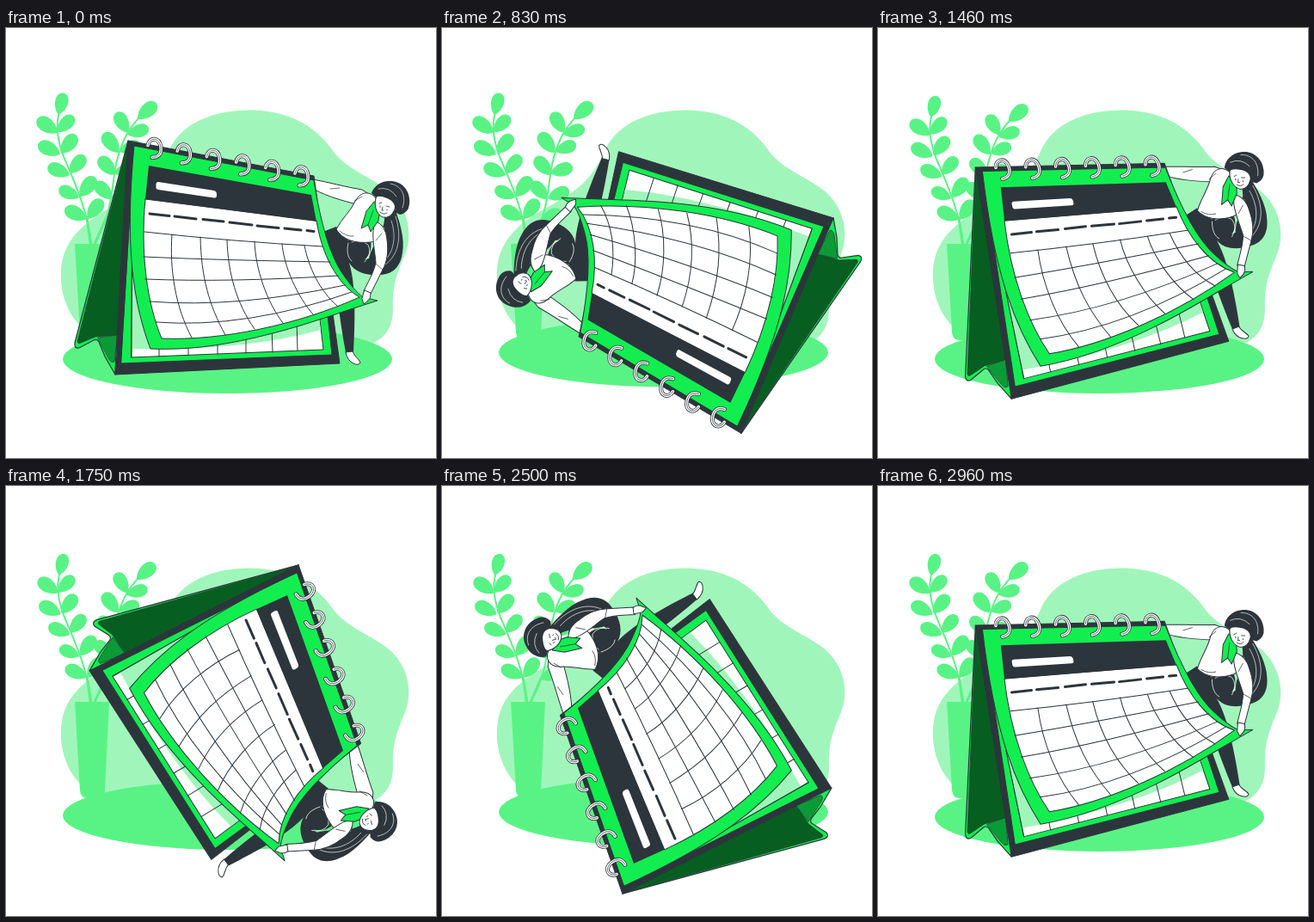
Animation, 500 px wide and 500 px high, one loop 3 s. Source, as an HTML page with a canvas:

```html
<!DOCTYPE html>
<html lang="en">
<head>
<meta charset="utf-8">
<title>Turning calendar</title>
<style>
html, body { margin: 0; width: 100%; height: 100%; overflow: hidden; background: #fff; }
canvas { display: block; width: 100vw; height: 100vh; }
</style>
</head>
<body>
<canvas id="stage" width="500" height="500"></canvas>
<script>
const ctx = document.getElementById('stage').getContext('2d');
const LOOP = 3000, FPS = 24, TICKS = 2.5, DEG_PER_TICK = 4;
const PIVOT = [275, 283];
const INK = '#2d353c', GREEN = '#12ee50', MID = '#59f385', PALE = '#a0f6ba';
const DARK = '#065f20', SHADE = '#0b9b36', WHITE = '#fff';

ctx.lineJoin = ctx.lineCap = 'round';

function shape(d, fill, stroke, width = 1) {
  const p = new Path2D(d);
  if (fill) { ctx.fillStyle = fill; ctx.fill(p); }
  if (stroke) { ctx.strokeStyle = stroke; ctx.lineWidth = width; ctx.stroke(p); }
}
const line = (d, width = 1, color = INK) => shape(d, null, color, width);

function leaf(x, y, tipX, tipY) {
  ctx.save();
  ctx.translate(x, y);
  ctx.rotate(Math.atan2(tipY - y, tipX - x));
  const n = Math.hypot(tipX - x, tipY - y);
  ctx.scale(n, n);
  shape('M0 0C.25 -.36 .96 -.45 1 -.02C.97 .38 .3 .36 0 0Z', MID);
  ctx.restore();
}

const LEAVES = [
  [61, 101, 68, 76], [60, 122, 37, 105], [60, 121, 79, 103], [63, 147, 38, 134],
  [64, 146, 82, 125], [74, 171, 49, 160], [74, 169, 92, 149], [85, 197, 62, 186],
  [86, 196, 104, 174], [94, 222, 69, 209], [95, 222, 112, 200],
  [153, 106, 175, 88], [142, 122, 129, 98], [141, 124, 166, 117], [131, 145, 114, 122],
  [132, 144, 156, 135], [127, 171, 109, 150], [126, 169, 152, 162], [123, 199, 105, 179],
  [123, 198, 148, 189], [115, 224, 139, 214]
];

function backdrop(angle) {
  shape('M100 358C75 342 62 312 64 282C66 248 88 228 118 211C160 188 172 178 188 146' +
    'C201 112 239 95.500 284 95.500C328 96 358 113 378 140C393 163 420 171 443 188' +
    'C467 207 474 238 464 263C455 285 449 298 450 326C450 346 443 358 428 366Z', PALE);
  ctx.fillStyle = MID;
  ctx.beginPath();
  ctx.ellipse(257.5, 381 + 4 * Math.cos(angle), 191.5, 40, 0, 0, 7);
  ctx.fill();
}

function plant(size) {
  ctx.save();
  ctx.translate(97, 255);
  ctx.scale(size, size);
  ctx.translate(-97, -255);
  line('M100 256C95 212 80 180 68 152C59 130 58 112 62 98', 2, MID);
  line('M100 256C124 218 122 190 128 158C134 134 140 120 156 103', 2, MID);
  line('M99 256L94 220M101 256L116 222', 3, MID);
  LEAVES.forEach(l => leaf(...l));
  ctx.restore();
  shape('M80 251H120L115 354Q114 363 106 363H95Q87 363 86 354Z', MID);
}

function stand() {
  shape('M142 131L80 366Q79 373 85 372L102 363Q106 361 108 365L115 382L127 403L142 300Z', GREEN, INK, 1.2);
  shape('M141 137L83 364Q83 368 87 366L104 359L130 357L142 300Z', DARK, INK, .7);
  shape('M107 360L130 357L126 388Q122 390 119 384Z', SHADE, INK, .7);
}

function backPage() {
  shape('M142 131L358 172L388 390L127 403Z', INK, INK);
  shape('M149 137L357 177L379 380L134 390Z', GREEN, INK);
  shape('M147 220L350 210L369 374L146 383Z', WHITE, INK);
  shape('M146.500 270V373Q275 376 366 351L355 280Z', PALE);
  line('M178 360V382M212 355V380.500M246 355V379M279 350V378M309 345L310 377M338 340L339 375');
  line('M147 220L146 383');
}

function frontPage() {
  shape('M149 137L358 177C364 215 374 262 393 288C400 298 408 308 415 313L432 317' +
    'C390 330 350 345 310 355C260 368 215 375 168 373C150 325 137 262 149 137Z', GREEN, INK);
  shape('M162 199L361 224C367 262 384 297 411 313C340 345 250 364 181 361' +
    'C164 320 156 262 162 199Z', WHITE, INK);
  shape('M166 160L355 194L361 225L162 199Z', INK);
  shape('M177 179L242 189Q245 190 245 193V195Q245 198 242 197.500L177 188Q174 187.500 174.500 184V182Q174.500 179 177 179Z', WHITE);

  line('M167 216L190 218.500M196 219L221 222M229 222.500L253 225M260 226L286 229' +
    'M292 230L317 232.500M324 233L343 235M350 235.500L358 236.500', 3);

  line('M161 237Q260 248 368 254M160 266Q245 270 377 272M162 292Q260 296 386 288' +
    'M167 318Q270 326 394 299M174 342Q280 350 402 307');
  line('M193 240C190 280 197 325 216 360M226 243C227 290 236 322 255 357' +
    'M257 246C258 285 268 320 289 350M289 248C290 280 303 318 322 343' +
    'M321 251C323 276 338 312 358 334M347 253C352 278 364 305 386 324');
}

function rings() {
  const arc = 'M-8 -3C-6 -13 5 -13 7 -1C8 7 4 11 -3 11';
  for (let i = 0; i < 6; i++) {
    ctx.save();
    ctx.translate(173 + i * 34.2, 139.500 + i * 6.500);
    line(arc, 5);
    line(arc, 3.4, WHITE);
    line(arc, .7);
    ctx.restore();
  }
}

function girl() {
  // hair and legs
  shape('M450 205C458 224 464 246 461 261C459 278 449 287 434 287C418 288 406 284 399 273' +
    'L422 268C426 250 442 238 440 215Z', INK);
  shape('M371 236L384 231L398 247L424 248C427 264 415 277 399 273C407 299 406 340 404 377' +
    'L395 377C388 340 385 310 382 285L370 242Z', INK);
  line('M398 250C396 259 397 267 402 271M402 249Q412 245 421 252Q426 262 417 272', .7, WHITE);
  line('M453 219C461 244 456 265 440 276M448 224C455 245 449 262 441 270', .6, WHITE);
  shape('M395 377L403 376C405 382 410 384 412 389Q410 393 404 390Q397 387 395 377Z', WHITE, INK);

  // far arm and torso
  shape('M357 176C374 179 395 185 414 188L422 193L408 205C392 201 374 196 359 188Z', WHITE, INK);
  shape('M407 200C413 190 423 189 430 198L427 222L441 233C438 243 431 248 424 249' +
    'C406 251 391 246 384 234C390 222 401 213 407 200Z', WHITE, INK);
  line('M388 236Q396 243 404 242M377 187L388 186M405 201L414 196', .7);

  // near arm
  shape('M429 224Q442 230 443 246C445 260 443 272 438 281L424 309L416 306C421 295 427 286 430 273' +
    'C429 260 426 247 427 236Z', WHITE, INK);
  line('M430 274L438 281M430 247L437 239', .7);

  // scarf, head and beret
  shape('M428 202L419 213L413 233L421 229L424 237L433 224L435 211Z', GREEN, INK);
  line('M427 212L421 229', .7);
  shape('M431 195C427 205 430 216 438 220Q447 222 452 211L454 199L442 191Z', WHITE, INK);
  shape('M425 192C428 183 437 177 448 178C463 179 471 192 469 205Q468 215 458 217L452 214' +
    'Q454 202 443 198Q434 194 430 197Z', INK);
  line('M447 181C460 183 466 195 461 209M433 187Q446 184 454 196', .6, WHITE);
  line('M434 204L437 203M442 207L446 208M435 207V208.500M443 211V212M438 208L437 212L439 212M435 214Q439 218 443 215', .8);
}

// two quick swells of the plant within each turn
const swell = (n, at) => Math.exp(-((n - at) ** 2) / 2.8);
function plantSize(k) {
  const n = k % 36;
  return .982 + .08 * (swell(n, 2) + swell(n, 18));
}

function draw() {
  const t = performance.now() % LOOP;
  const k = Math.floor((t + 5) * FPS / 1000) % 72;
  const angle = Math.floor(k * TICKS) * DEG_PER_TICK * Math.PI / 180;

  ctx.fillStyle = WHITE;
  ctx.fillRect(0, 0, 500, 500);
  backdrop(angle);
  plant(plantSize(k));

  ctx.save();
  ctx.translate(...PIVOT);
  ctx.rotate(angle);
  ctx.translate(-PIVOT[0], -PIVOT[1]);
  girl();
  stand();
  backPage();
  frontPage();
  rings();
  // fingers holding the page corner
  shape('M417 305L424 308Q425 314 420 318L416 321L414 315Z', WHITE, INK);
  ctx.restore();

  requestAnimationFrame(draw);
}
draw();
</script>
</body>
</html>
```
